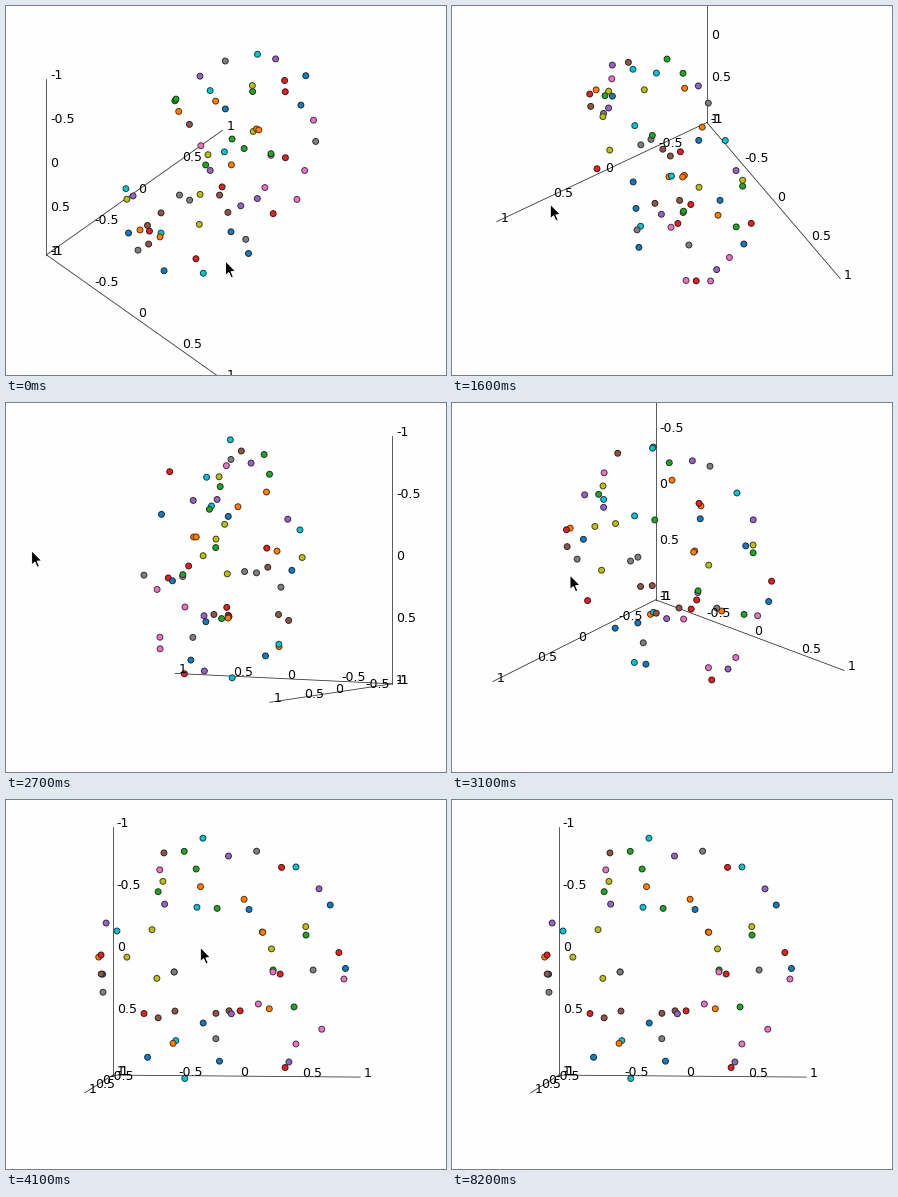
Write a matplotlib script that moves like this. It is 440 by 369 pixels and loops after 8.3 s.

```python
import numpy as np
import matplotlib.pyplot as plt
from matplotlib.animation import FuncAnimation
from matplotlib.colors import to_rgb
from matplotlib.patches import Polygon

W, H, DPI = 440, 369, 64
PX = 72 / DPI                      # one pixel in points
STEP, FRAMES = 100, 83
CENTER = np.array([216.5, 160.8])
SCALE = 124.5                      # pixels per data unit
GAIN = 0.85                        # degrees turned per dragged pixel
DRAG_START, DRAG_END, CURSOR_GONE = 1100, 4000, 4700
RING, TUBE = 0.7, 0.3              # torus radii

# angle around the ring, angle around the tube (degrees), grouped by colour
POINTS = {
    "#1f77b4": [(-27.7, 13), (-64.1, -147), (3.5, -18), (172.9, -17),
                (105, 131), (127.9, -10), (89.4, 73)],
    "#ff7f0e": [(-110.1, -107), (-72.8, -131), (-178.5, 11), (-35.4, 165),
                (-36, 169), (48.9, -124), (122.1, -68)],
    "#2ca02c": [(-111, -41), (-109, -79), (-130.3, 80), (-93.7, 153),
                (-16.6, -96), (8.2, 155), (35.5, -96)],
    "#d62728": [(-57, 43), (-177.1, 27), (-3.7, -43), (10, 132),
                (72.8, -154), (145.8, 85), (58.9, 12)],
    "#9467bd": [(-88.8, -65.5), (-37, -32), (-132.5, 101), (-162.9, -13),
                (78.4, 156), (57.5, -25)],
    "#8c564b": [(-118, 17), (134.2, -110), (138.8, -83), (95.7, 160),
                (83.8, -165), (173.8, 25)],
    "#e377c2": [(-122.8, 51.5), (7.8, 9), (10.3, 154.5), (47.1, 145),
                (33.3, 23), (46.3, 49)],
    "#7f7f7f": [(-73.9, -47), (3.5, 77), (166.1, -163), (166.7, 177),
                (164.9, 1), (92, 108)],
    "#bcbd22": [(-124.4, 71.5), (-153.6, 109.5), (-22.1, -92), (-13.8, -172),
                (-179.8, -69.5), (165.7, 127)],
    "#17becf": [(-99, 3), (-52.5, -36), (-112.4, 137), (-166.1, -47),
                (121.6, -74), (107.4, 15)],
}

# pointer path: time in ms, x, y
PATH = np.array([
    (0, 219.5, 255), (200, 219.5, 253), (1100, 219, 194.7),
    (1200, 213, 195), (1300, 197, 196), (1400, 170, 197),
    (1500, 135, 198), (1600, 98.3, 198.2), (1800, 72, 190),
    (2000, 56.9, 177.5), (2300, 30, 159), (2500, 22.5, 150),
    (2700, 25.6, 147.5), (2900, 46, 152), (3100, 118, 172),
    (3300, 190, 178), (3500, 213.7, 146.7), (3800, 170, 146.6),
    (4000, 158.4, 146.6), (4600, 374, 150),
])
ARROW = np.array([(0, 0), (0, 14.6), (3.3, 11.6), (5.6, 16.8),
                  (7.9, 15.8), (5.6, 10.7), (10.2, 10.4)])


def torus(uv):
    u, v = np.radians(uv).T
    rho = RING + TUBE * np.cos(v)
    return np.column_stack([rho * np.cos(u), rho * np.sin(u),
                            TUBE * np.sin(v)])


def pointer(t):
    return np.array([np.interp(t, PATH[:, 0], PATH[:, k]) for k in (1, 2)])


def angles(t):
    dx, dy = pointer(np.clip(t, DRAG_START, DRAG_END)) - pointer(DRAG_START)
    return np.radians(-45 - GAIN * dx), np.radians(45 + GAIN * dy)


def project(p, turn, tilt):
    """Orthographic view: pixel positions and closeness to the viewer."""
    x, y, z = np.asarray(p, float).T
    across = x * np.cos(turn) - z * np.sin(turn)
    near = x * np.sin(turn) + z * np.cos(turn)
    down = y * np.cos(tilt) + near * np.sin(tilt)
    closeness = near * np.cos(tilt) - y * np.sin(tilt)
    return CENTER + SCALE * np.column_stack([across, down]), closeness


cloud = np.vstack([torus(uv) for uv in POINTS.values()])
fills = np.array([to_rgb(c) for c, uv in POINTS.items() for _ in uv])
edges = fills * 0.343

CORNER = np.array([-1.0, 1.0, -1.0])
TICKS = (-1, -0.5, 0, 0.5, 1)
tick_pos, tick_text = [], []
for axis in range(3):
    for value in TICKS:
        p = CORNER.copy()
        p[axis] = value
        tick_pos.append(p)
        tick_text.append(f"{value:g}")
tick_pos = np.array(tick_pos)

fig = plt.figure(figsize=(W / DPI, H / DPI), dpi=DPI, facecolor="#fefefe")
ax = fig.add_axes([0, 0, 1, 1])
ax.set(xlim=(0, W), ylim=(H, 0))
ax.axis("off")

lines = [ax.plot([], [], color="#333333", lw=0.8 * PX, zorder=1)[0]
         for _ in range(3)]
dots = ax.scatter(cloud[:, 0], cloud[:, 1], s=(5.9 * PX) ** 2,
                  linewidths=0.95 * PX, zorder=2)
labels = [ax.text(0, 0, s, family="DejaVu Sans", size=12.5 * PX,
                  color="black", va="baseline", ha="left", zorder=3)
          for s in tick_text]
arrow = ax.add_patch(Polygon(ARROW, closed=True, fc="black", ec="white",
                             lw=1.0 * PX, joinstyle="round", zorder=4))


def draw(i):
    t = i * STEP
    view = angles(t)

    ticks, _ = project(tick_pos, *view)
    for k, line in enumerate(lines):
        ends = ticks[[5 * k, 5 * k + 4]]
        line.set_data(ends[:, 0], ends[:, 1])
    for label, (x, y) in zip(labels, ticks):
        label.set_position((x + 3.8, y))

    pos, closeness = project(cloud, *view)
    order = np.argsort(closeness)
    dots.set_offsets(pos[order])
    dots.set_facecolors(fills[order])
    dots.set_edgecolors(edges[order])

    arrow.set_xy(ARROW + pointer(t))
    arrow.set_visible(t < CURSOR_GONE)
    return [*lines, dots, *labels, arrow]


anim = FuncAnimation(fig, draw, frames=FRAMES, interval=STEP,
                     repeat=True, repeat_delay=0, blit=False)
plt.show()
```
